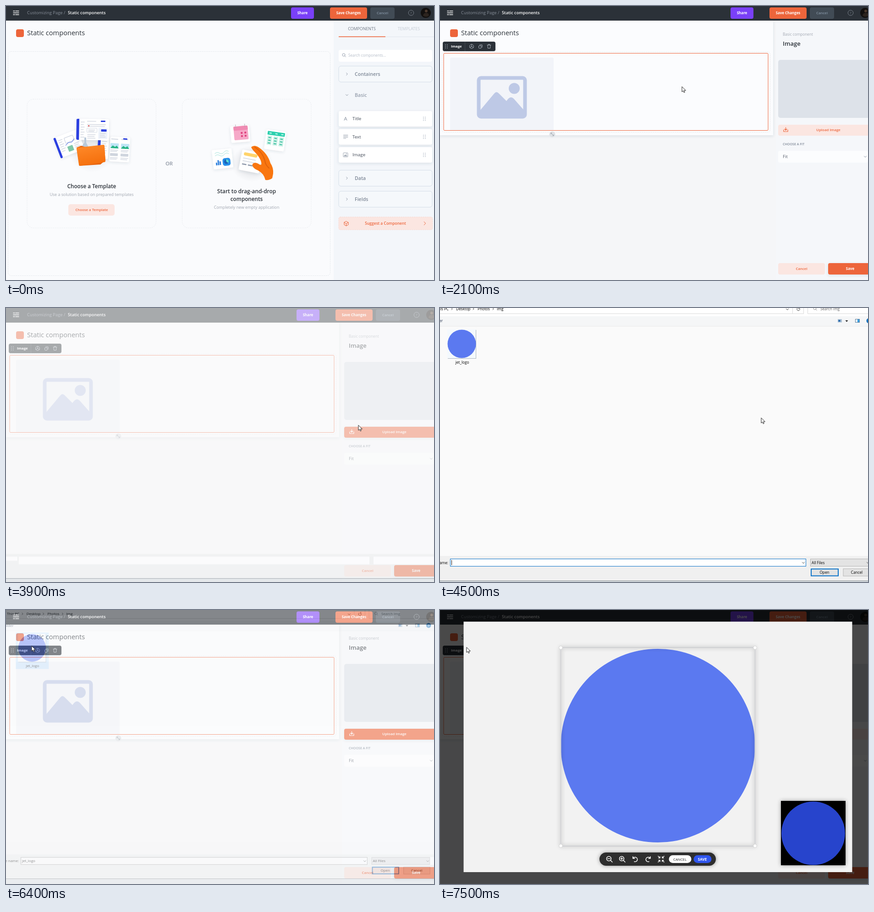
These frames come from a looping animation (934x600 px, 8 s). An HTML page:

```html
<!DOCTYPE html>
<html lang="en">
<head>
<meta charset="utf-8">
<title>Uploading an image</title>
<style>
  html, body { margin: 0; width: 100%; height: 100%; overflow: hidden; background: #fafbfd; }
  svg { display: block; width: 934px; height: 600px; font-family: "Open Sans", "Noto Sans", sans-serif; }
</style>
</head>
<body>
<svg id="stage" viewBox="0 0 934 600"></svg>
<script>
const ORANGE = '#ed653b', PINK = '#fbe6e1', INK = '#2b3138', GREY = '#7d8796', BLUE = '#2b3fe0', LOGO = '#5b79f0';

// ---- markup helpers
const rect = (x, y, w, h, fill, r = 0, more = '') =>
  `<rect x="${x}" y="${y}" width="${w}" height="${h}" rx="${r}" fill="${fill}" ${more}/>`;
const frame = (x, y, w, h, stroke, r = 0, more = '') => rect(x, y, w, h, 'none', r, `stroke="${stroke}" ${more}`);
const circle = (x, y, r, fill, more = '') => `<circle cx="${x}" cy="${y}" r="${r}" fill="${fill}" ${more}/>`;
const line = (d, stroke, width = 1, fill = 'none') =>
  `<path d="${d}" stroke="${stroke}" stroke-width="${width}" fill="${fill}" stroke-linecap="round" stroke-linejoin="round"/>`;
const shape = (d, fill) => `<path d="${d}" fill="${fill}"/>`;
const text = (x, y, str, size, fill, weight = 400, anchor = 'start', more = '') =>
  `<text x="${x}" y="${y}" font-size="${size}" fill="${fill}" font-weight="${weight}" text-anchor="${anchor}" ${more}>${str}</text>`;
const mid = (x, y, str, size, fill, weight = 600, more = '') => text(x, y, str, size, fill, weight, 'middle', more);
const group = (id, ...parts) => `<g id="${id}">${parts.join('')}</g>`;
const moved = (x, y, angle, ...parts) => `<g transform="translate(${x} ${y}) rotate(${angle})">${parts.join('')}</g>`;
const repeat = (n, fn) => Array.from({ length: n }, (_, i) => fn(i)).join('');
const dashed = 'stroke-dasharray="2 2"';
const soft = 'filter="url(#soft)"', halo = 'filter="url(#halo)"';

// ---- small icons
const chevron = (x, y, turn, color = '#8b95a3', s = 2.5) =>
  moved(x, y, turn, line(`M${-s / 2} ${-s}L${s / 2} 0L${-s / 2} ${s}`, color));
const grip = (x, y, color) => repeat(6, i => circle(x + i % 2 * 4, y + (i >> 1) * 3.5 - 3.5, .9, color));
const glass = (x, y, color, sign = '', s = 1) => moved(x, y, 0,
  `<g transform="scale(${s})">${line('M3 3L6 6M4 0A4 4 0 1 1-4 0A4 4 0 1 1 4 0' + sign, color, 1.2)}</g>`);
const picture = (x, y, color) =>
  frame(x - 5, y - 4.5, 10, 9, color, 1) + shape(`M${x - 4} ${y + 3}l3-4 2 2 1-1 2 3z`, color) + circle(x + 2, y - 2, 1, color);
const upload = color => line('M750 271v4h9v-4M754.5 266v6m-2.5-2.5l2.5 2.5 2.5-2.5', color, 1.2);

// ---- top bar
const topBar = group('top',
  rect(0, 0, 934, 32, INK),
  line('M16 11H19M21 11H28M16 15H28M16 19H19M21 19H28', '#fff', 1.4),
  text(46, 18, 'Customizing Page /', 9.4, '#88909a'),
  text(135, 18, 'Static components', 9.2, '#fff', 600),
  group('actions',
    rect(622, 3, 50, 25, '#7a40f8', 4), mid(647, 18, 'Share', 8, '#fff', 700),
    rect(707, 3, 81, 25, ORANGE, 4), mid(747.5, 18, 'Save Changes', 7.9, '#fff', 700),
    rect(795, 3, 53, 25, '#414b55', 4), mid(821.5, 18, 'Cancel', 7.9, '#8494a4'),
    circle(884, 15, 5.8, 'none', 'stroke="#757d86"'), mid(884, 18, '?', 8, '#757d86', 400),
    circle(916, 15, 11, '#12100f'), circle(917, 11, 3, '#4c3a2e'), shape('M910 21Q911 15 917 15T923 21Q917 26 910 21', '#2c241f')));

const heading = rect(22, 51, 17, 17, ORANGE, 4) + text(46, 64, 'Static components', 14.6, INK);

// ---- start page
const bars = (x, y, w, n, step, color = '#d9dde5') => repeat(n, i => rect(x, y + i * step, w - i % 2 * 2, 1.8, color, .5));
const sheet = (w, h) => rect(0, 0, w, h, '#fff', 3, soft);

const templateArt = [
  `<ellipse cx="187" cy="312" rx="52" ry="52" fill="url(#glow)"/>`,
  moved(103, 290, -21, sheet(56, 46), rect(0, 0, 5, 47, BLUE, 2), bars(8, 8, 10, 6, 5),
    frame(22, 8, 20, 12, '#c4cbda', 1), line('M20 24l8-4 7 2 7-5', '#4a6be0'), rect(22, 28, 12, 12, '#7fc8a9', 1), bars(38, 26, 12, 3, 4)),
  moved(201, 290, 3, sheet(24, 44), rect(0, 0, 6, 18, BLUE, 1), bars(9, 5, 11, 6, 5)),
  moved(228, 286, 3, sheet(43, 54),
    repeat(2, i => rect(2 + i * 22, 4, 15, 2, '#d5dae3') + rect(1 + i * 23, 14, 18, 11, '#bfe5f5', 1) +
      shape(`M${1 + i * 23} 25l5-6 5 3 4-3 4 6z`, '#28b485') + bars(1 + i * 23, 28, 17, 2, 3) + rect(1 + i * 23, 36, 17, 6, '#cfd5de', 1) + bars(1 + i * 23, 45, 17, 2, 3)),
    rect(28, 2, 9, 3, BLUE, 1)),
  moved(154, 247, 1, sheet(71, 46), shape('M0 2Q0 0 3 0H6V46H3Q0 46 0 43Z', BLUE), bars(9, 6, 9, 7, 5.5),
    bars(23, 4, 20, 1, 1), rect(53, 3, 10, 3, BLUE, 1), bars(23, 11, 41, 2, 4), circle(27, 15, 1.5, '#d84a4a'),
    frame(23, 20, 22, 9, '#d6dce6', 1), bars(26, 23, 15, 2, 3), rect(48, 19, 20, 24, '#eef3fb', 1), rect(54, 22, 12, 5, BLUE, 1),
    bars(51, 30, 13, 3, 4), bars(24, 33, 18, 3, 4)),
  shape('M171 288H175V299L180 309H164L171 299Z', '#b9c9d9'),
  shape('M154 310L164 306 174 309 214 304 217 338 206 347 160 350Z', '#e8640c'),
  shape('M154 313Q154 310 157 310L212 304Q215 304 215 307L217 339Q217 342 214 342L162 350Q159 350 159 347Z', 'url(#folder)')
].join('');

const dragArt = [
  `<ellipse cx="537" cy="345" rx="46" ry="40" fill="url(#glow)"/>`,
  moved(489, 264, -5, sheet(41, 36), rect(7, 1, 31, 30, '#f6a9c8', 2), rect(7, 1, 31, 9, '#f08bb3', 2),
    line('M12-3V4M32-3V4', '#b9a3b0'), repeat(4, i => rect(22 + i % 2 * 8, 14 + (i >> 1) * 7, 4, 4, '#e0437f', 1))),
  moved(569, 270, 8, sheet(43, 43), rect(3, 3, 38, 8, '#2dcfae', 1),
    repeat(3, i => rect(4 + i * 13, 13, 10, 20, '#ccf1e7', 1) + rect(7 + i * 13, 6, 5, 2, '#c7fff0') +
      repeat(3, j => rect(6 + i * 13, 16 + j * 6, 6, 2, '#35bd9c', 1)))),
  moved(449, 316, -6, sheet(43, 42), line('M6 8q5-4 10 0t10-1 10-1M6 13q5-4 10 0t10-1 10-1', '#8fdcd2', .8),
    repeat(3, i => rect(6 + i * 4, 34 - [6, 11, 8][i], 3, [6, 11, 8][i], '#3182de')), rect(21, 20, 17, 17, '#258fea', 5),
    circle(29, 28, 5, '#1b62b9'), shape('M29 28V23A5 5 0 0 1 33 31Z', '#5be0d2')),
  moved(516, 314, 11, sheet(45, 45), rect(5, 5, 30, 7, '#ffd36a', 3), bars(5, 17, 28, 2, 6, '#d7dbe3'),
    rect(5, 30, 10, 2.5, '#8e98aa', 1), rect(18, 30, 11, 2.5, '#8e98aa', 1)),
  shape('M535 309Q542 303 552 310Q571 323 577 344Q584 354 583 367L581 377Q575 382 566 381Q563 367 550 360Q536 354 538 346Q543 340 553 347Q559 350 557 342Q554 331 543 320Q537 314 535 309Z', '#f9760f'),
  line('M543 309Q560 320 565 339Q566 348 574 355', '#df610b', 2)
].join('');

const section = (y, name, open) =>
  (open ? '' : rect(726, y - 17.5, 204, 35, '#f5f8fb', 5, 'stroke="#d4dee8"')) +
  chevron(744, y, open ? 90 : 0) + text(761, y + 4, name, 10.6, open ? '#959eac' : GREY, 600);
const itemTops = [230, 269.5, 309];
const item = (i, name, icon) => group('item' + i,
  rect(726, itemTops[i], 204, 34, '#fff', 4, soft), icon, text(756, itemTops[i] + 20, name, 9.8, '#414956'), grip(911, itemTops[i] + 17, '#b4bcc8'));

const home = group('home',
  rect(0, 32, 934, 568, '#fafbfd'), rect(715, 32, 219, 568, '#f3f6fa'), heading,
  frame(4.5, 99.5, 703, 491, '#dfe3e8', 7, dashed),
  frame(46, 204, 281.5, 282, '#e6e9ed', 14, dashed), frame(384.5, 204, 281.5, 282, '#e6e9ed', 14, dashed),
  templateArt, dragArt,
  mid(187, 399, 'Choose a Template', 11.7, INK),
  mid(187, 416, 'Use a solution based on prepared templates', 8.9, '#a0a6b0', 400),
  rect(136, 434, 101, 25, PINK, 5), mid(187, 449, 'Choose a Template', 7.8, ORANGE),
  mid(356, 349, 'OR', 11.4, '#8f97a4'),
  mid(525, 410, 'Start to drag-and-drop', 11.9, INK), mid(525, 427, 'components', 11.7, INK),
  mid(525, 444, 'Completely new empty application', 8.9, '#a0a6b0', 400),
  mid(776.5, 53, 'COMPONENTS', 8.9, '#6d7683', 400), mid(879, 53, 'TEMPLATES', 9.1, '#c3cad3', 400, 'id="tab"'),
  rect(828, 67, 106, 1, '#e0e6ec'), rect(726, 66.5, 102, 1.6, ORANGE),
  rect(726, 96, 204, 26, '#fff', 4), glass(737, 107, '#8d97a6', '', .75), text(747, 111, 'Search components...', 8.2, '#b5bdc8'),
  section(149, 'Containers'), section(195, 'Basic', true), section(377, 'Data'), section(423, 'Fields'),
  item(0, 'Title', line('M738 250.5L741 243L744 250.5M739 248H743', '#9099a6')),
  item(1, 'Text', line('M736.5 282.5H746M736.5 285H746M736.5 287.5H746M736.5 290H742', '#a0a8b4')),
  item(2, 'Image', picture(741, 326, '#a0a8b4')),
  rect(726, 462, 205, 28, PINK, 4, `stroke="#f7d3ca" ${dashed}`),
  line('M742.5 471.5l4.5 2.5v5l-4.5 2.5-4.5-2.5v-5zM738 474l4.5 2.5 4.5-2.5M742.5 476.5v5', ORANGE),
  mid(828, 479, 'Suggest a Component', 8.5, ORANGE), chevron(914, 476, 0, ORANGE, 3.5));

// ---- component editor
const editor = group('editor',
  rect(0, 32, 934, 568, '#f5f6f8'), rect(0, 32, 727, 251, '#fbfcfe', 0, soft), rect(733, 32, 201, 568, '#f5f7fa'), heading,
  frame(4.5, 100.5, 716, 176, '#e3e7ec', 5, dashed),
  rect(22, 113, 226, 160, '#f2f4f9', 3),
  frame(84.5, 157.5, 101, 85, '#bec9e6', 5, 'stroke-width="8"'), circle(162, 180.5, 12, '#bec9e6'),
  shape('M88 228L118 192Q123 185 129 192L145 208L149 203Q155 197 161 203L183 228V241H88Z', '#bec9e6'),
  frame(8, 103.5, 708, 169, ORANGE, 2),
  rect(6, 78, 115, 21, INK, 4), grip(12, 88.5, '#8f979f'), text(24, 91, 'Image', 7.7, '#fff', 700), rect(54, 78, 1, 21, '#414850'),
  circle(69, 88.5, 4.5, 'none', 'stroke="#a9b0b8"'), line('M69 88.5V84M69 88.5L65 91M69 88.5L73 91', '#a9b0b8'),
  frame(84.5, 87, 5.5, 5.5, '#a9b0b8', 1), line('M86.5 85H92V90.5', '#a9b0b8'),
  line('M103 85.5H111M105.5 85.5V84H108.5V85.5M104 86L104.5 92.5H109.5L110 86', '#a9b0b8'),
  circle(245, 281, 6.5, '#dfe2e6'), line('M242 280V278H244M242 278L248 284M246 284H248V282', '#8c949e', .8),
  text(748, 65, 'Basic component', 8.2, '#a3a9b3'), text(748, 87, 'Image', 13, INK, 600),
  rect(738, 118, 210, 127, '#dde2e9', 5),
  group('uploadIdle', rect(738, 260, 210, 24, PINK, 4), upload(ORANGE), mid(847.5, 274, 'Upload Image', 7.9, ORANGE)),
  group('uploadHover', rect(738, 260, 210, 24, ORANGE, 4, soft), upload('#fff'), mid(847.5, 274, 'Upload Image', 7.9, '#fff')),
  text(748, 305, 'CHOOSE A FIT', 7.1, GREY, 600),
  rect(738, 317, 196, 26, '#fcfdfe', 4), text(748, 333, 'Fit', 9.8, '#5b6370'), chevron(928, 330, 90),
  rect(738, 563, 102, 25, PINK, 4), mid(789, 578, 'Cancel', 7.9, ORANGE),
  rect(847, 563, 100, 25, ORANGE, 4, soft), mid(895, 578, 'Save', 8, '#fff', 700));

// ---- system file dialog
const label = (x, y, str, anchor = 'start', more = '') => text(x, y, str, 8.2, '#000', 400, anchor, more);
const dialog = group('dialog',
  rect(-90, -40, 1130, 638, '#fafafa'), rect(-90, 543, 1130, 55, '#f0f0f0'),
  rect(-90, 597, 1130, 1.2, '#7d858c'), rect(-90, 598.2, 1130, 30, '#dbe0e4'),
  rect(22, 549, 777, 17, '#fff'), rect(808, 549, 150, 17, '#fff'), rect(-90, 549, 109, 9, '#fff', 0, 'id="blank"'),
  group('details',
    rect(-90, 543, 109, 24, '#f0f0f0'), rect(-90, -40, 1130, 79, '#fff'), rect(-90, 18, 1130, 21, '#f5f6f7'), rect(-90, 39.5, 1130, 1, '#e8e9ea'),
    line('M-90 12.5H793.5V-20M769.5 12.5V-20M958 12.5H802.5V-20', '#d9d9d9'),
    label(19, 5, 'This PC', 'end'), label(35, 5, 'Desktop'), label(82, 5, 'Photos'), label(124, 5, 'Img'),
    [26, 73, 116].map(x => chevron(x, 2, 0, '#444', 2)).join(''), chevron(758, 3, 90, '#333'),
    line('M784 0A3.2 3.2 0 1 1 780 0M784-2V0.5H782', '#444'), glass(818, 1, '#888', '', .7), text(830, 5, 'Search Img', 8.2, '#666'),
    text(6, 31, 'New folder', 8.2, '#1c2b45', 400, 'end'),
    rect(868, 24.5, 9, 7, '#a9bfd3'), rect(869.5, 26, 4, 4, '#2c6cae'), shape('M884.5 27h6l-3 3.5z', '#222'),
    frame(906.5, 24.5, 9, 7, '#5f7f9d'), rect(911, 25, 4, 6, '#3b9fe0'), circle(936, 28, 5.5, '#1370bd'), mid(936, 31, '?', 8, '#fff'),
    rect(11, 44, 74, 82, '#e2f1fd', 0, 'id="tile"'), rect(17, 48, 62, 63, '#aab4bf'), rect(16, 47, 62, 63, '#f4f9fd'),
    circle(47.5, 78.5, 31, LOGO), label(48.5, 122, 'jet_logo', 'middle'),
    label(18, 560.5, 'File name:', 'end'),
    frame(22.5, 549.5, 776, 16, '#0a72c8', 0, 'id="field"'), rect(25, 552, 1, 11, '#111', 0, 'id="caret"'),
    label(25, 560.5, 'jet_logo', 'start', 'id="filename"'), chevron(793, 558, 90, '#444'),
    rect(808.5, 549.5, 130, 16, '#e3e3e3', 0, 'stroke="#b5b5b5"'), label(811, 560.5, 'All Files'), chevron(934, 558, 90, '#444'),
    rect(810, 571.5, 59, 15, '#e3e3e3', 0, 'stroke="#0a72c8" stroke-width="2"'), label(839, 582, 'Open', 'middle'),
    rect(880, 571, 59, 16, '#e3e3e3', 0, 'stroke="#b5b5b5"'), label(909.5, 582, 'Cancel', 'middle')));

// ---- crop window
const cropper = group('cropper',
  rect(0, 0, 934, 600, '#000', 0, 'opacity=".71"'), rect(51.5, 25.5, 848, 548.5, '#f2f2f2'),
  circle(475.5, 297, 212, LOGO),
  frame(263.5, 82, 424, 435, '#cfd0d3', 0, `stroke-width="2" ${halo}`),
  repeat(4, i => circle(263.5 + i % 2 * 424, 82.5 + (i >> 1) * 434, 3.8, '#fff', 'stroke="#d5d5d5"')),
  rect(744, 418, 141, 141, '#000', 0, halo), circle(814.5, 489, 69.5, '#2744cc'),
  rect(348, 531, 254, 29, '#2d2d2f', 14.5, halo),
  glass(368.5, 544.5, '#fff', 'M-2 0H2', 1.25), glass(396.5, 544.5, '#fff', 'M-2 0H2M0-2V2', 1.25),
  line('M421 540V544H425M421.5 543.5A5 5 0 1 1 424 551M459 540V544H455M458.5 543.5A5 5 0 1 0 456 551', '#fff', 1.6),
  line('M476 539l4 4m0-3v3h-3M489 539l-4 4m0-3v3h3M476 552l4-4m0 3v-3h-3M489 552l-4-4m0 3v-3h3', '#fff', 1.4),
  rect(499.5, 537, 49, 17, '#fff', 8.5), mid(523.5, 548.5, 'CANCEL', 7.8, '#222', 400),
  rect(553.5, 537, 39, 17, '#2f55ee', 8.5), mid(572.5, 548.5, 'SAVE', 8, '#fff', 700));

const crossPath = 'M-7 0H7M0-7V7M-5-2L-7 0L-5 2M5-2L7 0L5 2M-2-5L0-7L2-5M-2 5L0 7L2 5';
const pointers =
  group('drag', rect(-36, -5, 204, 34, '#fff', 4, `stroke="${ORANGE}" opacity=".85"`), picture(-21, 12, '#a0a8b4'), text(-6, 15, 'Image', 9.8, '#414956')) +
  group('arrow', line('M0 0V11L2.6 8.7L4.4 12.6L6.2 11.8L4.5 8H8Z', '#222', 1, '#fff')) +
  group('cross', line(crossPath, '#fff', 3), line(crossPath, '#444', 1.1));

const stage = document.getElementById('stage');
stage.innerHTML = `<defs>
  <filter id="soft" x="-20%" y="-20%" width="140%" height="150%"><feDropShadow dx="0" dy="2" stdDeviation="3" flood-color="#33425a" flood-opacity=".12"/></filter>
  <filter id="halo" x="-20%" y="-50%" width="140%" height="200%"><feDropShadow dx="0" dy="0" stdDeviation="4" flood-opacity=".4"/></filter>
  <radialGradient id="glow"><stop offset=".5" stop-color="#e9eaed"/><stop offset="1" stop-color="#fafbfd"/></radialGradient>
  <linearGradient id="folder" x2=".3" y2="1"><stop stop-color="#ff8b2b"/><stop offset="1" stop-color="#f5700d"/></linearGradient>
</defs>` + home + editor + topBar + dialog + cropper + group('pointer', pointers);

// ---- timeline
const el = Object.fromEntries([...stage.querySelectorAll('[id]')].map(node => [node.id, node]));
const hoverRing = itemTops.map((_, i) => el['item' + i].querySelector('rect'));
const show = (name, alpha) => {
  el[name].style.display = alpha ? '' : 'none';
  el[name].setAttribute('opacity', +alpha);
};
function tween(keys, t) {
  const i = keys.findIndex(key => key[0] > t);
  if (i < 0) return keys[keys.length - 1].slice(1);
  if (!i) return keys[0].slice(1);
  const [from, to] = [keys[i - 1], keys[i]], k = (t - from[0]) / (to[0] - from[0]);
  return from.slice(1).map((v, j) => v + (to[j + 1] - v) * k);
}
const pointerPath = [[0, 960, 74], [99, 960, 74], [100, 912, 76], [300, 912, 76], [400, 895, 110], [1200, 778, 322], [1300, 762, 314],
  [1500, 762, 314], [2000, 528, 177], [2300, 528, 177], [2400, 552, 189], [2600, 552, 189], [3400, 783, 266], [3500, 783, 266],
  [3700, 775, 259], [3800, 775, 259], [3900, 769, 257], [4400, 769, 257], [5000, 361, 161], [5300, 100, 114], [5500, 56, 79],
  [7300, 56, 79], [7500, 58, 82]];
const editorFade = [[1800, 0], [2100, 1]];
const dialogFade = [[3800, 0], [3900, .6], [4200, 1], [6200, 1], [6300, .75], [6400, .42], [7399, .42], [7400, 0]];
const dialogScale = [[3900, .985], [4200, 1], [6200, 1], [6400, .974]];

function render(now) {
  const t = Math.floor(now % 8000 / 100) * 100;
  const [x, y] = tween(pointerPath, t);
  const [edit] = tween(editorFade, t), [scale] = tween(dialogScale, t);
  const onItems = t < 2000 && y > 230, dragging = t >= 1600 && t < 2000;
  const onUpload = t >= 3300 && t < 7400;

  show('home', edit < 1);
  show('editor', edit);
  el.actions.setAttribute('transform', `translate(${edit >= .5 ? 12 : 0} 0)`);
  el.tab.setAttribute('fill', t >= 100 && t < 400 ? '#8f99a6' : '#c3cad3');
  hoverRing.forEach((ring, i) => {
    const over = dragging ? i === 2 : onItems && y >= itemTops[i] && y < itemTops[i] + 35;
    ring.setAttribute('stroke', over ? ORANGE : 'none');
    ring.setAttribute('stroke-width', 1.5);
  });
  show('uploadIdle', !onUpload);
  show('uploadHover', onUpload);

  show('dialog', tween(dialogFade, t)[0]);
  el.dialog.setAttribute('transform', `translate(407 250) scale(${scale}) translate(-407 -250)`);
  show('details', t >= 4100);
  show('blank', t < 4100);
  show('caret', t < 6000 && t % 1000 >= 500);
  show('filename', t >= 6000);
  show('tile', t >= 5400);
  el.tile.setAttribute('fill', t >= 6000 ? '#cce8ff' : '#e2f1fd');
  el.field.setAttribute('stroke', t >= 6000 ? '#999' : '#0a72c8');

  show('cropper', t < 7400 ? 0 : t < 7500 ? .5 : 1);
  el.pointer.setAttribute('transform', `translate(${x} ${y})`);
  show('drag', dragging);
  show('cross', onItems);
  show('arrow', !onItems);
}
const tick = () => { render(performance.now()); requestAnimationFrame(tick); };
tick();
</script>
</body>
</html>
```
